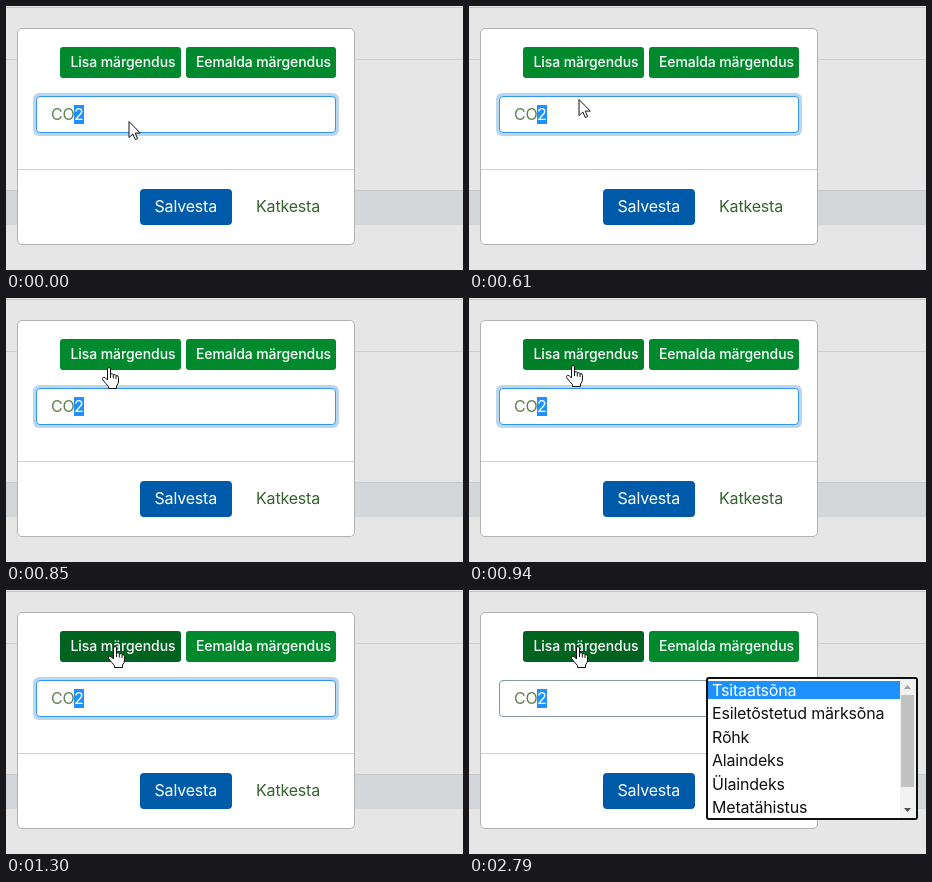
These frames come from a looping animation (457x264 px, 3.88 s). An HTML page with a canvas:

```html
<!DOCTYPE html>
<html lang="et">
<head>
<meta charset="utf-8">
<style>
html, body { margin: 0; width: 100%; height: 100%; overflow: hidden; background: #e6e6e6; }
canvas { display: block; }
</style>
</head>
<body>
<canvas id="stage" width="457" height="264"></canvas>
<script>
const ctx = document.getElementById('stage').getContext('2d');
const LOOP = 3880, HOVER = 940, CLICK = 2030, MENU = 2790;
const GREEN = [0, 138, 45], DARK = [0, 99, 32], BLUE = '#1e90ff';
const ITEMS = ['Tsitaatsõna', 'Esiletõstetud märksõna', 'Rõhk', 'Alaindeks', 'Ülaindeks', 'Metatähistus'];

// [time, x, y] of the pointer's top left corner
const ARROW = [[0, 122.5, 115], [400, 121.5, 113], [490, 118.5, 108], [550, 114, 100],
  [610, 109.5, 93], [700, 107, 85], [760, 104.5, 77]];
const HAND = [[850, 96, 69], [940, 97, 67], [1030, 98, 64], [1090, 99, 62],
  [1150, 100, 60], [1240, 101, 58], [1300, 102, 56]];

const arrowPath = new Path2D('M.5 .5V16.6L4.3 13L6.8 18.6L9.1 17.6L6.7 12.1H11.8Z');
const handPath = new Path2D('M5.5 13V2Q5.5 .5 7 .5T8.5 2V7Q11 6 11.3 7.8Q13.6 7 14 8.7Q16.5 8 16.5 10.5V14Q16.5 17 14.5 19V21.5H6.5V19.5Q4 17 .7 12.7Q0 11 1.4 10.3Q3 9.8 5.5 13Z');
const knuckles = new Path2D('M8.5 7V11M11.3 8V11.5M14 9V12');

function rect(x, y, w, h, fill) {
  ctx.fillStyle = fill;
  ctx.fillRect(x, y, w, h);
}

function box(x, y, w, h, r, fill, line, width = 1) {
  ctx.beginPath();
  ctx.roundRect(x, y, w, h, r);
  if (fill) { ctx.fillStyle = fill; ctx.fill(); }
  if (line) { ctx.strokeStyle = line; ctx.lineWidth = width; ctx.stroke(); }
}

function text(str, x, y, color, size = 16, weight = 400, spacing = -0.011) {
  ctx.font = `${weight} ${size}px Inter, sans-serif`;
  ctx.letterSpacing = size * spacing + 'px';
  ctx.fillStyle = color;
  ctx.fillText(str, x, y);
}

function triangle(x, y, dir, color) {
  ctx.beginPath();
  ctx.moveTo(x - 3.5, y + 2 * dir);
  ctx.lineTo(x + 3.5, y + 2 * dir);
  ctx.lineTo(x, y - 2 * dir);
  ctx.fillStyle = color;
  ctx.fill();
}

function mix(a, b, k) {
  return `rgb(${a.map((v, i) => Math.round(v + (b[i] - v) * k))})`;
}

function page() {
  rect(0, 0, 457, 264, '#e6e6e6');
  rect(0, 1, 457, 1, '#c6c6c6');
  rect(0, 53, 457, 1, '#d0d0d0');
  rect(0, 184, 457, 35, '#d3d7da');
  rect(0, 184, 457, 1, '#c5c9cc');
  box(11.5, 22.5, 337, 216, 4.5, '#fff', '#b2b2b2');
  rect(12, 163, 336, 1, '#cfcfcf');
}

function form(t) {
  const pressed = t >= CLICK && t < MENU;
  const hover = t < HOVER ? 0 : Math.min(1, (stepTime(t) - HOVER + 60) / 210);
  if (pressed) box(51, 38, 127, 37, 6, '#80c596');
  box(54, 41, 121, 31, 3, pressed ? '#00521b' : mix(GREEN, DARK, hover));
  box(180, 41, 150, 31, 3, mix(GREEN, GREEN, 0));
  if (pressed) {
    ctx.beginPath();
    ctx.arc(106, 56, 11.5, 0, 7);
    ctx.fillStyle = '#879c0e';
    ctx.fill();
  }
  text('Lisa märgendus', 64.5, 61, '#fff', 14, 500, -0.006);
  text('Eemalda märgendus', 190, 61, '#fff', 14, 500, -0.006);

  const focus = t < CLICK;
  if (focus) box(27, 87, 306, 43, 6, '#bad7ef');
  box(30.5, 90.5, 299, 36, 3.5, '#fff', focus ? '#2f96f3' : '#8997a6');
  text('CO', 45, 114, '#5d8150');
  rect(68, 99, 10, 19, BLUE);
  text('2', 68, 114, '#fff');

  box(134, 183, 92, 36, 4, '#005aaa');
  text('Salvesta', 148.5, 206, '#fff');
  text('Katkesta', 250, 206, '#35632f');
}

function menu() {
  box(238, 88, 210, 141, 2, '#fff', '#101010', 2);
  rect(239, 91, 192, 18, BLUE);
  ITEMS.forEach((s, i) => text(s, 243, Math.round(106 + i * 23.4), i ? '#101010' : '#fff'));
  rect(431, 89, 16, 139, '#f1f1f1');
  rect(432, 105, 13, 92, '#c1c1c1');
  triangle(438.5, 97, 1, '#a3a3a3');
  triangle(438.5, 220, -1, '#505050');
}

function keyAt(keys, t) {
  return keys.filter(k => k[0] <= t).pop();
}

function stepTime(t) {
  return keyAt(HAND, t)[0];
}

function pointer(t) {
  const hand = t >= HAND[0][0];
  const [, x, y] = keyAt(hand ? HAND : ARROW, t);
  ctx.save();
  ctx.translate(x, y);
  ctx.lineJoin = 'round';
  ctx.lineWidth = 1;
  ctx.fillStyle = '#fff';
  ctx.strokeStyle = '#111';
  const shape = hand ? handPath : arrowPath;
  ctx.fill(shape);
  ctx.stroke(shape);
  if (hand) ctx.stroke(knuckles);
  ctx.restore();
}

function draw(now) {
  const t = now % LOOP;
  page();
  form(t);
  if (t >= MENU) menu();
  pointer(t);
  requestAnimationFrame(draw);
}
draw(0);
</script>
</body>
</html>
```
